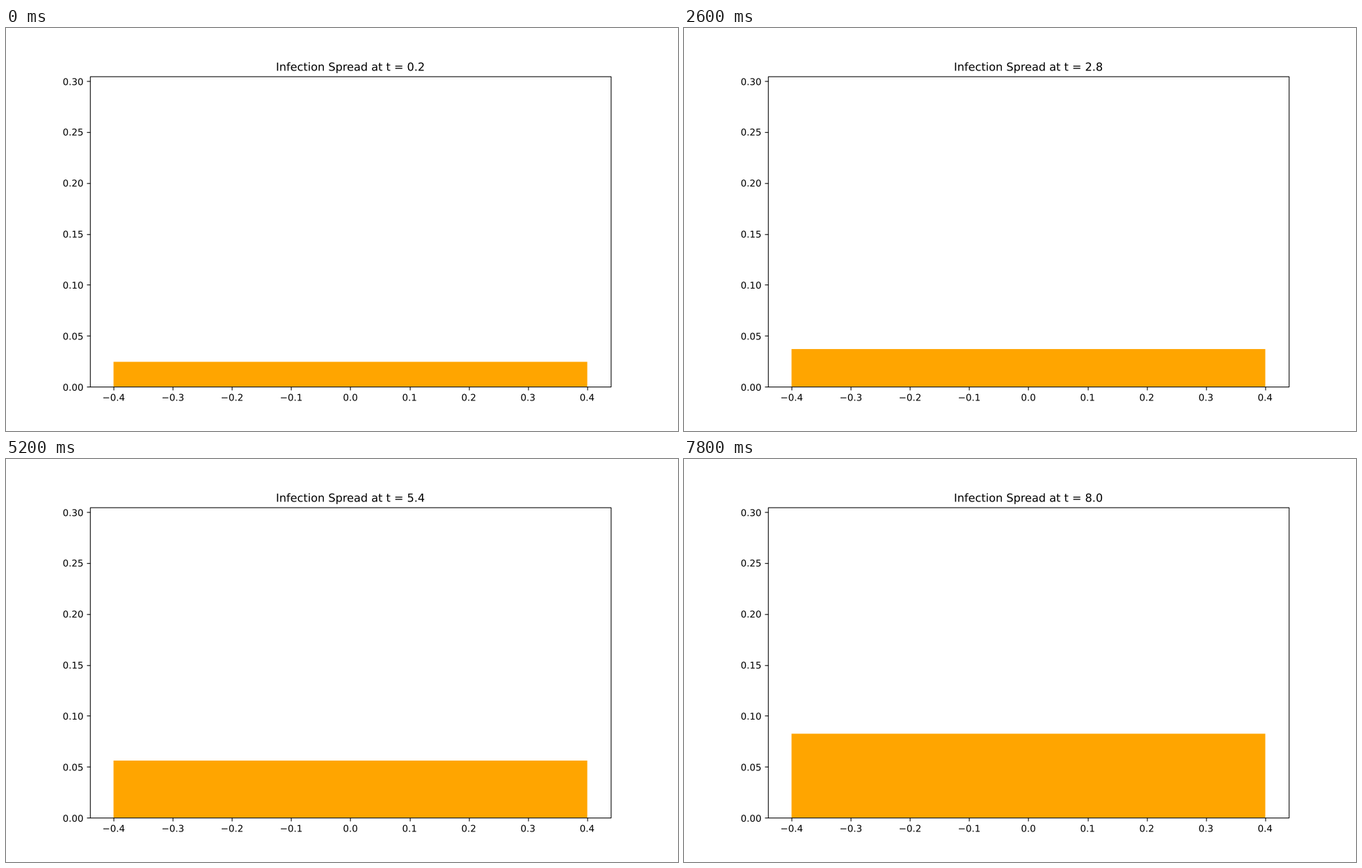
These frames come from a looping animation (966 px wide and 580 px high, 8 s). A matplotlib script:

```python
import math

import matplotlib.pyplot as plt
from matplotlib.animation import FuncAnimation
from matplotlib.patches import PathPatch, Rectangle
from matplotlib.textpath import TextPath
from matplotlib.transforms import Affine2D

plt.rcParams["font.family"] = "DejaVu Sans"

W, H, DPI = 966, 580, 100
# The chart is laid out in a 1000 x 600 space, y down, shrunk onto the stage.
LAYOUT_W, LAYOUT_H = 1000, 600
LEFT, RIGHT, TOP, BOTTOM = 125, 900, 72, 534
PT = DPI / 72                      # layout pixels per point
LINE = 0.8 * W / LAYOUT_W          # line width in points
X_LIM, Y_MAX = 0.44, 0.3047
TICK = 5
LABEL_GAP = 7 * PT
STEP, FRAMES = 0.2, 40

fig = plt.figure(figsize=(W / DPI, H / DPI), dpi=DPI, facecolor="white")
ax = fig.add_axes([0, 0, 1, 1])
ax.set_xlim(0, LAYOUT_W)
ax.set_ylim(LAYOUT_H, 0)
ax.axis("off")


def glyphs(text, points):
    return TextPath((0, 0), text, size=points * PT)


def advance(text, points):
    """Pen width of the text, side bearings included."""
    end = glyphs(text + "0", points).get_extents().x1
    return end - glyphs("0", points).get_extents().x1


def label(text, x, y, points=10, align=0.5):
    """Text on baseline y; align is the part of its width left of x."""
    x -= align * advance(text, points)
    place = Affine2D().scale(1, -1).translate(x, y) + ax.transData
    patch = PathPatch(glyphs(text, points), facecolor="black", linewidth=0,
                      snap=False, transform=place)
    return ax.add_patch(patch)


def stroke(xs, ys):
    ax.plot(xs, ys, color="black", linewidth=LINE, snap=False,
            solid_capstyle="butt", zorder=3)


def draw_axes():
    ax.add_patch(Rectangle((LEFT + 0.5, TOP + 0.5), RIGHT - LEFT, BOTTOM - TOP,
                           fill=False, edgecolor="black", linewidth=LINE,
                           snap=False, zorder=3))
    for k in range(-4, 5):
        x = LEFT + (RIGHT - LEFT) * (k / 10 + X_LIM) / (2 * X_LIM)
        mid = round(x) + 0.5
        stroke([mid, mid], [BOTTOM + 0.5, BOTTOM + 0.5 + TICK])
        text = f"{k / 10:.1f}".replace("-", "\u2212")
        label(text, x, round(BOTTOM + LABEL_GAP + 11))
    for k in range(7):
        y = BOTTOM - (BOTTOM - TOP) * 0.05 * k / Y_MAX
        mid = round(y) + 0.5
        stroke([LEFT + 0.5 - TICK, LEFT + 0.5], [mid, mid])
        label(f"{0.05 * k:.2f}", LEFT - LABEL_GAP, round(y + 5.5), align=1)


def caption(t):
    return f"Infection Spread at t = {t:.1f}"


def bar_height(t):
    """Infected share in layout pixels: growth that slowly loses pace."""
    height = math.exp(3.57486 + 0.1656 * t - 0.0011 * t * t)
    return math.floor(height + 0.5)


draw_axes()
title = label(caption(0), (LEFT + RIGHT) / 2, TOP - 6 * PT, points=12)
bar = ax.add_patch(Rectangle((160, BOTTOM), 705, 0, facecolor="orange",
                             linewidth=0, snap=False))


def update(i):
    t = (i + 1) * STEP
    height = bar_height(t)
    bar.set_y(BOTTOM - height)
    bar.set_height(height)
    title.set_path(glyphs(caption(t), 12))
    return bar, title


anim = FuncAnimation(fig, update, frames=FRAMES, interval=200,
                     repeat=True, repeat_delay=0, blit=False)
plt.show()
```
